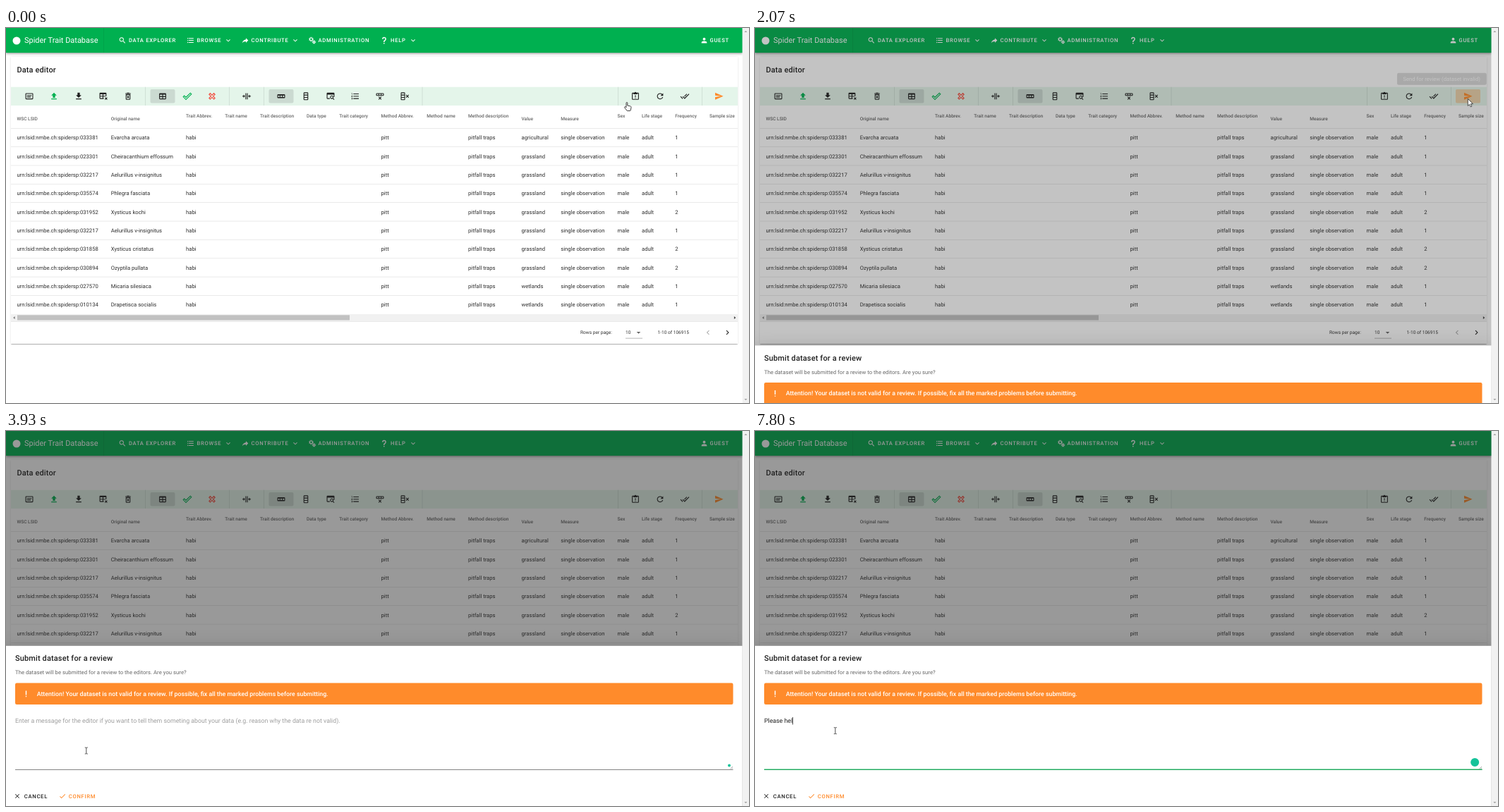
An HTML page that plays this animation: 1053x532 px, repeating every 8 s.

```html
<!DOCTYPE html>
<html lang="en">
<head>
<meta charset="utf-8">
<title>Data editor</title>
<style>
  html, body { margin: 0; width: 100%; height: 100%; overflow: hidden; background: #fff; }
  svg { display: block; width: 100%; height: 100%; font-family: Roboto, Arial, sans-serif; }
  text { white-space: pre; fill: #212121; text-rendering: geometricPrecision; }
  .cell { font-size: 7.68px; fill: #2e2e2e; }
  .head { font-size: 6.58px; font-weight: 500; fill: #666; }
  .small { font-size: 6.58px; fill: #333; }
  .brand { font-size: 10.97px; fill: #fff; }
  .title { font-size: 10.97px; font-weight: 500; letter-spacing: .0125em; }
  .btn { font-size: 7.68px; font-weight: 500; letter-spacing: .0893em; }
  .sub { font-size: 7.68px; letter-spacing: .0071em; fill: #666; }
  .alert { font-size: 8.775px; font-weight: 500; fill: #fff; }
  .field { font-size: 8.775px; }
</style>
</head>
<body>
<svg id="stage" viewBox="0 0 1053 532"></svg>
<script>
const LOOP = 8000, TICK = 1000 / 15, UNIT = .5484, PAGE = 1043.7;
const GREEN = '#00b050', ORANGE = '#ff8b2b', INK = '#1f1f1f';

// Icons on a 24-unit grid
const ICON = {
  search: 'M9.5 3A6.5 6.5 0 0 1 16 9.5c0 1.6-.6 3.1-1.6 4.2l.3.3h.8l5 5-1.5 1.5-5-5v-.8l-.3-.3A6.5 6.5 0 1 1 9.5 3m0 2a4.5 4.5 0 1 0 0 9 4.5 4.5 0 0 0 0-9z',
  list: 'M7 5h14v2H7zM7 11h14v2H7zM7 17h14v2H7zM4 4.5a1.5 1.5 0 1 1 0 3 1.5 1.5 0 0 1 0-3M4 10.5a1.5 1.5 0 1 1 0 3 1.5 1.5 0 0 1 0-3M4 16.5a1.5 1.5 0 1 1 0 3 1.5 1.5 0 0 1 0-3z',
  share: 'M21 12l-7-7v4C7 10 4 15 3 20c2.5-3.5 6-5.1 11-5.1V19z',
  help: 'M10 19h3v3h-3zM12 2c5.35.22 7.68 5.62 4.5 9.67-.83 1-2.17 1.66-2.83 2.5C13 15 13 16 13 17h-3c0-1.67 0-3.08.67-4.08.66-1 2-1.59 2.83-2.25C15.92 8.43 15.32 5.26 12 5a3 3 0 0 0-3 3H6a6 6 0 0 1 6-6z',
  down: 'M7.4 8.6L12 13.2l4.6-4.6L18 10l-6 6-6-6z',
  user: 'M12 4a4 4 0 1 1 0 8 4 4 0 0 1 0-8m0 10c4.4 0 8 1.8 8 4v2H4v-2c0-2.2 3.6-4 8-4z',
  note: 'M4 4h16a2 2 0 0 1 2 2v12a2 2 0 0 1-2 2H4a2 2 0 0 1-2-2V6a2 2 0 0 1 2-2m0 2v12h16V6zM6 9h12v2H6zM6 13h10v2H6z',
  upload: 'M9 16v-6H5l7-7 7 7h-4v6zM5 18h14v2H5z',
  download: 'M5 18h14v2H5zM19 9h-4V3H9v6H5l7 7z',
  tableX: 'M15.5 15.9l1.4-1.4 2.1 2.1 2.1-2.1 1.4 1.4-2.1 2.1 2.1 2.1-1.4 1.4-2.1-2.1-2.1 2.1-1.4-1.4 2.1-2.1zM4 3h14a2 2 0 0 1 2 2v7a6 6 0 0 0-4.3 1H12v4h1v2H4a2 2 0 0 1-2-2V5a2 2 0 0 1 2-2m0 4v4h6V7zm8 0v4h6V7zm-8 6v4h6v-4z',
  trash: 'M6 7h12v12a2 2 0 0 1-2 2H8a2 2 0 0 1-2-2zm2 2v10h8V9zM15.5 4H19v2H5V4h3.5l1-1h5zM9.2 12l1.2-1.2 1.6 1.7 1.6-1.7 1.2 1.2-1.6 2 1.6 2-1.2 1.2-1.6-1.7-1.6 1.7L9.2 16l1.6-2z',
  table: 'M5 4h14a2 2 0 0 1 2 2v12a2 2 0 0 1-2 2H5a2 2 0 0 1-2-2V6a2 2 0 0 1 2-2m0 4v4h6V8zm8 0v4h6V8zm-8 6v4h6v-4zm8 0v4h6v-4z',
  okLine: 'M19.8 2.2L24 6.4 8.4 22 0 13.5l4.2-4.2 4.2 4.2zm0 2.8L8.4 16.4l-4.2-4.2-1.4 1.4 5.6 5.6L21.2 6.4z',
  noLine: 'M3 16.7L7.8 12 3 7.3 7.3 3 12 7.8 16.7 3 21 7.3 16.2 12l4.8 4.7-4.3 4.3-4.7-4.8L7.3 21zm2.8 0l1.5 1.5 4.7-4.8 4.7 4.8 1.5-1.5-4.8-4.7 4.8-4.7-1.5-1.5-4.7 4.8-4.7-4.8-1.5 1.5 4.8 4.7z',
  squeeze: 'M9 4h2v16H9zM13 4h2v16h-2zM1 11h3V8l4 4-4 4v-3H1zM23 11h-3V8l-4 4 4 4v-3h3z',
  row: 'M4 7h16a2 2 0 0 1 2 2v6a2 2 0 0 1-2 2H4a2 2 0 0 1-2-2V9a2 2 0 0 1 2-2m0 3v4h4v-4zm6 0v4h4v-4zm6 0v4h4v-4z',
  column: 'M8 2h8a2 2 0 0 1 2 2v16a2 2 0 0 1-2 2H8a2 2 0 0 1-2-2V4a2 2 0 0 1 2-2m0 2v4h8V4zm0 6v4h8v-4zm0 6v4h8v-4z',
  tableFind: 'M4 3h16a2 2 0 0 1 2 2v9h-2V8H4v9h6v2H4a2 2 0 0 1-2-2V5a2 2 0 0 1 2-2M15 10a4.5 4.5 0 0 1 3.8 6.9L22 20l-1.5 1.5-3.2-3.1A4.5 4.5 0 1 1 15 10m0 2a2.5 2.5 0 1 0 0 5 2.5 2.5 0 0 0 0-5z',
  numbers: 'M7 5h14v2H7zM7 11h14v2H7zM7 17h14v2H7zM3 8V5H2V4h2v4zM2 17v-1h3v4H2v-1h2v-.5H3v-1h1V17zM2 10h3v1.2L3.1 13H5v1H2v-1l2-2H2z',
  rowX: 'M9.4 13l2.6 2.6 2.6-2.6 1.4 1.4-2.6 2.6 2.6 2.6-1.4 1.4-2.6-2.6L9.4 21 8 19.6l2.6-2.6L8 14.4zM22 9a2 2 0 0 1-2 2H4a2 2 0 0 1-2-2V6a2 2 0 0 1 2-2h16a2 2 0 0 1 2 2zM4 9h4V6H4zm6 0h4V6h-4zm6 0h4V6h-4z',
  columnX: 'M4 2h7a2 2 0 0 1 2 2v16a2 2 0 0 1-2 2H4a2 2 0 0 1-2-2V4a2 2 0 0 1 2-2m0 8v4h7v-4zm0 6v4h7v-4zM4 4v4h7V4zm13.6 8L15 9.4 16.4 8l2.6 2.6L21.6 8 23 9.4 20.4 12l2.6 2.6-1.4 1.4-2.6-2.6-2.6 2.6-1.4-1.4z',
  clip: 'M5 3h4.2a3 3 0 0 1 5.6 0H19a2 2 0 0 1 2 2v14a2 2 0 0 1-2 2H5a2 2 0 0 1-2-2V5a2 2 0 0 1 2-2m0 2v14h14V5h-2v2H7V5zM11 9h2v5h-2zM11 15.5h2v2h-2z',
  refresh: 'M17.65 6.35A8 8 0 1 0 19.73 14h-2.08A6 6 0 1 1 16.22 7.78L13 11h7V4z',
  checks: 'M.4 13.4L6 19l1.4-1.4L1.8 12zM22.2 5.6L11.7 16.2 7.5 12l-1.4 1.4 5.6 5.6 12-12zM18 7l-1.4-1.4-6.4 6.3 1.5 1.4z',
  send: 'M2 21l21-9L2 3v7l15 2-15 2z',
  left: 'M15.4 16.6L10.8 12l4.6-4.6L14 6l-6 6 6 6z',
  right: 'M8.6 16.6l4.6-4.6-4.6-4.6L10 6l6 6-6 6z',
  drop: 'M7 10l5 5 5-5z',
  close: 'M19 6.4L17.6 5 12 10.6 6.4 5 5 6.4l5.6 5.6L5 17.6 6.4 19l5.6-5.6 5.6 5.6 1.4-1.4-5.6-5.6z',
  check: 'M21 7L9 19l-5.5-5.5 1.4-1.4L9 16.2 19.6 5.6z',
  bang: 'M10.7 4h2.6v11h-2.6zM10.7 17.5h2.6V20h-2.6z'
};

// Shadow layers: [offset, blur, spread, alpha]
const SHADOW = {
  card: [[3, 1, -2, .2], [2, 2, 0, .14], [1, 5, 0, .12]],
  bar: [[2, 4, -1, .2], [4, 5, 0, .14], [1, 10, 0, .12]],
  sheet: [[11, 15, -7, .2], [24, 38, 3, .14], [9, 46, 8, .12]]
};

const icon = (name, x, y, fill = INK, s = UNIT) =>
  `<path transform="translate(${x - 12 * s} ${y - 12 * s}) scale(${s})" fill="${fill}" fill-rule="evenodd" d="${ICON[name]}"/>`;
const text = (cls, x, y, s, more = '') => `<text class="${cls}" x="${x}" y="${y}" ${more}>${s}</text>`;
const rect = (x, y, w, h, fill, more = '') =>
  `<rect x="${x}" y="${y}" width="${w}" height="${h}" fill="${fill}" ${more}/>`;
const panel = (x, y, w, h, fill, layers) => layers.map(([dy, blur, grow, alpha]) => {
  const g = grow * UNIT;
  return rect(x - g, y - g + dy * UNIT, w + 2 * g, h + 2 * g, '#000',
    `opacity="${alpha}" style="filter:blur(${blur * UNIT / 2}px)"`);
}).join('') + rect(x, y, w, h, fill);
const tri = (x, y, turn, fill) =>
  `<path d="M-2 1.1L0-1.3 2 1.1z" transform="translate(${x} ${y}) rotate(${turn})" fill="${fill}"/>`;
const gear = (x, y, r) =>
  `<g fill="none" stroke="#fff" transform="translate(${x} ${y})"><circle r="${r}" stroke-width="1.2"/>` +
  `<circle r="${r + .9}" stroke-width="1" stroke-dasharray="${(r + .9) * Math.PI / 8}"/></g>`;

function topBar() {
  const items = [['search', 165, 174, 'DATA EXPLORER'], ['list', 261.5, 270.5, 'BROWSE', 315],
    ['share', 339, 347.5, 'CONTRIBUTE', 410], ['', 0, 442.5, 'ADMINISTRATION'], ['help', 536, 545, 'HELP', 577],
    ['user', 989.5, 997.5, 'GUEST']];
  let s = panel(0, 0, PAGE, 35.1, GREEN, SHADOW.bar) + rect(138, 0, .55, 35.1, '#000', 'opacity=".12"') +
    '<circle cx="15" cy="18" r="5.5" fill="#fff"/>' + text('brand', 26, 21.3, 'Spider Trait Database') +
    gear(432.5, 16, 2) + gear(436.5, 20, 1.3);
  for (const [name, ix, tx, label, arrow] of items) {
    if (name) s += icon(name, ix, 17.6, '#fff', .48);
    s += text('btn', tx, 20.3, label, 'style="fill:#fff"');
    if (arrow) s += icon('down', arrow, 17.6, '#fff', .48);
  }
  return s;
}

function toolbar() {
  const tools = [['note', 33], ['upload', 68, GREEN], ['download', 103], ['tableX', 138], ['trash', 173],
    ['table', 222], ['okLine', 257, GREEN], ['noLine', 292, '#f44336'], ['squeeze', 341], ['row', 390],
    ['column', 425], ['tableFind', 460], ['numbers', 495], ['rowX', 530], ['columnX', 565],
    ['clip', 892], ['refresh', 927], ['checks', 962]];
  return rect(7, 83.7, 1030, 26.3, '#e4f5ea') +
    [204.5, 372.5].map(x => rect(x, 87, 35, 19.6, '#cbdad1', 'rx="2"')).join('') +
    [197.7, 316.4, 365.5, 590, 867.5, 986.5].map(x => rect(x - .3, 83.7, .6, 26.3, '#c3d2c9')).join('') +
    tools.map(([n, x, c]) => icon(n, x, 96.8, c)).join('') +
    rect(993, 87, 35, 19.6, ORANGE, 'rx="2" id="hover"') +
    `<clipPath id="btnClip">${rect(993, 87, 35, 19.6, '#000', 'rx="2"')}</clipPath>` +
    `<g clip-path="url(#btnClip)"><circle id="ripple" cx="1011" cy="97" fill="${ORANGE}"/></g>` +
    icon('send', 1010.5, 96.8, ORANGE);
}

function table() {
  const cols = [[15.4, 'WSC LSID', 1], [148.7, 'Original name', 1], [255, 'Trait Abbrev.'], [310.3, 'Trait name'],
    [360, 'Trait description'], [426, 'Data type'], [472.2, 'Trait category'], [531.5, 'Method Abbrev.'],
    [596.2, 'Method name'], [655, 'Method description'], [730.5, 'Value', 1], [786.2, 'Measure', 1],
    [866.5, 'Sex'], [901, 'Life stage'], [948.3, 'Frequency'], [997, 'Sample size']];
  const rows = [['033381', 'Evarcha arcuata', 'agricultural', 1], ['023301', 'Cheiracanthium effossum', 'grassland', 1],
    ['032217', 'Aelurillus v-insignitus', 'grassland', 1], ['035574', 'Phlegra fasciata', 'grassland', 1],
    ['031952', 'Xysticus kochi', 'grassland', 2], ['032217', 'Aelurillus v-insignitus', 'grassland', 1],
    ['031858', 'Xysticus cristatus', 'grassland', 2], ['030894', 'Ozyptila pullata', 'grassland', 2],
    ['027570', 'Micaria silesiaca', 'wetlands', 1], ['010134', 'Drapetisca socialis', 'wetlands', 1]];
  let s = cols.map(([x, t, low]) => text('head', x, low ? 131 : 126.5, t)).join('');
  rows.forEach(([id, name, value, n], i) => {
    const y = 158.2 + i * 26.35;
    const cells = ['urn:lsid:nmbe.ch:spidersp:' + id, name, 'habi', '', '', '', '', 'pitt', '', 'pitfall traps',
      value, 'single observation', 'male', 'adult', n];
    s += rect(7, 142 + i * 26.35, 1030, .6, '#dcdcdc');
    cells.forEach((c, j) => { if (c) s += text('cell', cols[j][0], y, c); });
  });
  return s + rect(7, 406, 1030, 10, '#f1f1f1') + rect(16, 407.3, 471, 7.2, '#c1c1c1') +
    tri(11.5, 411, -90, '#777') + tri(1033, 411, 90, '#444') + rect(7, 416, 1030, .6, '#dcdcdc') +
    text('small', 814, 434.4, 'Rows per page:') + text('small', 878, 434.4, '10') +
    icon('drop', 896.5, 432, '#666') + rect(878, 439.8, 24, .6, '#888') +
    text('small', 923.5, 434.4, '1-10 of 106915') +
    icon('left', 995, 432, '#b0b0b0') + icon('right', 1022.5, 432);
}

const tooltip = `<g id="tip">${rect(910, 63.8, 126.8, 17, '#616161', 'rx="2.2" opacity=".9"')}` +
  text('cell', 918.5, 75, 'Send for review (dataset invalid)', 'style="fill:#fff"') + '</g>';

const sheet = `<g id="sheet">${panel(0, 304.8, PAGE, 228, '#fff', SHADOW.sheet)}` +
  text('title', 13, 326.3, 'Submit dataset for a review') +
  text('sub', 13, 345, 'The dataset will be submitted for a review to the editors. Are you sure?') +
  rect(13, 357.5, 1017.5, 30.5, ORANGE, 'rx="2.2"') + icon('bang', 28.5, 372.8, '#fff') +
  text('alert', 43.7, 375.9, 'Attention! Your dataset is not valid for a review. If possible, fix all the marked problems before submitting.') +
  text('field', 13, 414, 'Enter a message for the editor if you want to tell them someting about your data (e.g. reason why the data re not valid).', 'id="hint" style="fill:#9e9e9e"') +
  text('field', 13, 414, '', 'id="typed"') + rect(0, 406, .7, 10.5, '#000', 'id="caret"') +
  '<path d="M1026.5 479.5l3.5-3.5M1028.5 479.5l1.5-1.5" stroke="#777" stroke-width=".6"/>' +
  rect(13, 480, 1017.5, .6, '#949494', 'id="line"') + rect(13, 479.6, 1017.5, 1.15, GREEN, 'id="focus"') +
  '<circle id="badge" fill="#15c39a"/>' +
  icon('close', 16, 518, INK, .43) + text('btn', 25.8, 520.7, 'CANCEL') +
  icon('check', 80, 518, ORANGE, .46) + text('btn', 88.8, 520.7, 'CONFIRM', `style="fill:${ORANGE}"`) + '</g>';

const cursors = '<g id="mouse">' +
  '<path id="hand" d="M-1 .8C-1-.3.8-.3.8.8V4.5l4 .9c1 .3 1.3.9 1.2 1.8l-.6 3.3-.7 1.5H.3L-3.3 7.5c-.6-1 .6-1.8 1.3-1.2l1 .9z" fill="#fff" stroke="#111" stroke-width=".8"/>' +
  '<path id="arrow" d="M0 0V10l2.3-2.1 1.6 3.5 1.7-.7L4 7.3h3.2z" fill="#fff" stroke="#111" stroke-width=".7"/>' +
  '<path id="beam" d="M-2-4.5H-.5L0-4 .5-4.5H2M0-4V4M-2 4.5H-.5L0 4 .5 4.5H2" fill="none" stroke="#222" stroke-width=".8"/></g>';

document.getElementById('stage').innerHTML =
  rect(0, 0, 1053, 532, '#fff') + panel(7, 41, 1030, 407, '#fff', SHADOW.card) + topBar() +
  text('title', 15.4, 62.9, 'Data editor') + toolbar() + table() + tooltip +
  rect(0, 0, PAGE, 532, '#212121', 'id="scrim"') + sheet +
  rect(PAGE, 0, 9.3, 532, '#f1f1f1') + tri(1048.4, 5, 0, '#a3a3a3') + tri(1048.4, 527, 180, '#a3a3a3') + cursors;

const el = {};
document.querySelectorAll('[id]').forEach(n => { el[n.id] = n; });
const set = (id, attrs) => { for (const k in attrs) el[id].setAttribute(k, attrs[k]); };
const show = (id, on) => set(id, { opacity: +on });

// Tables of [time, value, ...], linear in between
const PATH = [[0, 880, 105.5], [130, 888, 104], [400, 942, 100], [600, 1004, 101], [730, 1012, 102], [930, 1012, 102],
  [1070, 1010.3, 100.4], [2400, 1010.3, 100.4], [2530, 990, 113], [2670, 925, 145], [2730, 820, 209], [2800, 702, 258],
  [2930, 480, 342], [3070, 300, 402], [3200, 195, 434], [3330, 139, 449], [3530, 113.8, 453.5],
  [3930, 113.8, 453.5], [4330, 113.8, 426], [5800, 113.8, 426], [5870, 113.8, 425.2]];
const OPEN = [[2000, 0], [2070, .36], [2130, .874], [2200, .967], [2270, 1]];
const SCRIM = [[2000, 0], [2070, .27], [2130, .41], [2200, .45], [2270, .46]];
const TIP = [[600, 0], [730, 1], [2000, 1], [2070, .25], [2130, 0]];
const HOVER = [[540, 0], [670, .1], [2530, .1], [2600, 0]];
const RIPPLE = [[1670, 0], [1730, 5.5], [1800, 5.5], [1870, 13], [1930, 22], [2000, 30]];
const GLOW = [[1670, .25], [2070, .25], [2130, .04], [2200, 0]];
const FOCUS = [[4600, 0], [4670, .12], [4740, .45], [4800, .72], [4870, .88], [4930, .97], [5000, 1]];
const BADGE = [[7400, 1025, 474.5, 2], [7800, 1020.2, 470, 6]];
const TYPED = [[0, ''], [5870, 'P'], [7070, 'Please he'], [7470, 'Please hel']];

function at(keys, t) {
  const i = keys.findIndex(k => k[0] > t);
  if (i < 1) return (i ? keys[keys.length - 1] : keys[0]).slice(1);
  const a = keys[i - 1], b = keys[i], p = (t - a[0]) / (b[0] - a[0]);
  return a.slice(1).map((v, j) => v + (b[j + 1] - v) * p);
}

// Start of the 15-per-second step that holds at time t
function snap(t) {
  const time = k => Math.round(k * TICK / 10) * 10;
  let k = Math.floor(t / TICK) + 1;
  while (time(k) > t) k--;
  return time(k);
}

function draw(now) {
  const t = snap(now % LOOP);
  const [x, y] = at(PATH, t), [open] = at(OPEN, t), [focus] = at(FOCUS, t);
  const inField = y > 400, kind = inField ? 'beam' : t < 540 ? 'hand' : 'arrow';
  set('mouse', { transform: `translate(${x} ${y})` });
  ['hand', 'arrow', 'beam'].forEach(k => show(k, k === kind));

  set('tip', { opacity: at(TIP, t)[0] });
  set('hover', { opacity: at(HOVER, t)[0] });
  set('ripple', { r: at(RIPPLE, t)[0], opacity: at(GLOW, t)[0] });

  set('scrim', { opacity: at(SCRIM, t)[0] });
  set('sheet', { transform: `translate(0 ${(1 - open) * 227.5})` });
  show('sheet', t >= 2000);
  set('line', { fill: inField ? '#333' : '#949494' });
  set('focus', { x: 521.75 - 508.75 * focus, width: 1017.5 * focus });

  const typed = TYPED.filter(k => k[0] <= t).pop()[1];
  if (el.typed.textContent !== typed) el.typed.textContent = typed;
  show('hint', !typed);
  set('caret', { x: 13 + (typed ? el.typed.getComputedTextLength() : 0) });
  show('caret', t >= 4670 && !(t >= 5200 && t < 5730));

  const [bx, by, r] = at(BADGE, t);
  set('badge', { cx: bx, cy: by, r });
  show('badge', t >= 2730);
}

const start = performance.now();
function loop() {
  draw(performance.now() - start);
  requestAnimationFrame(loop);
}
loop();
</script>
</body>
</html>
```
